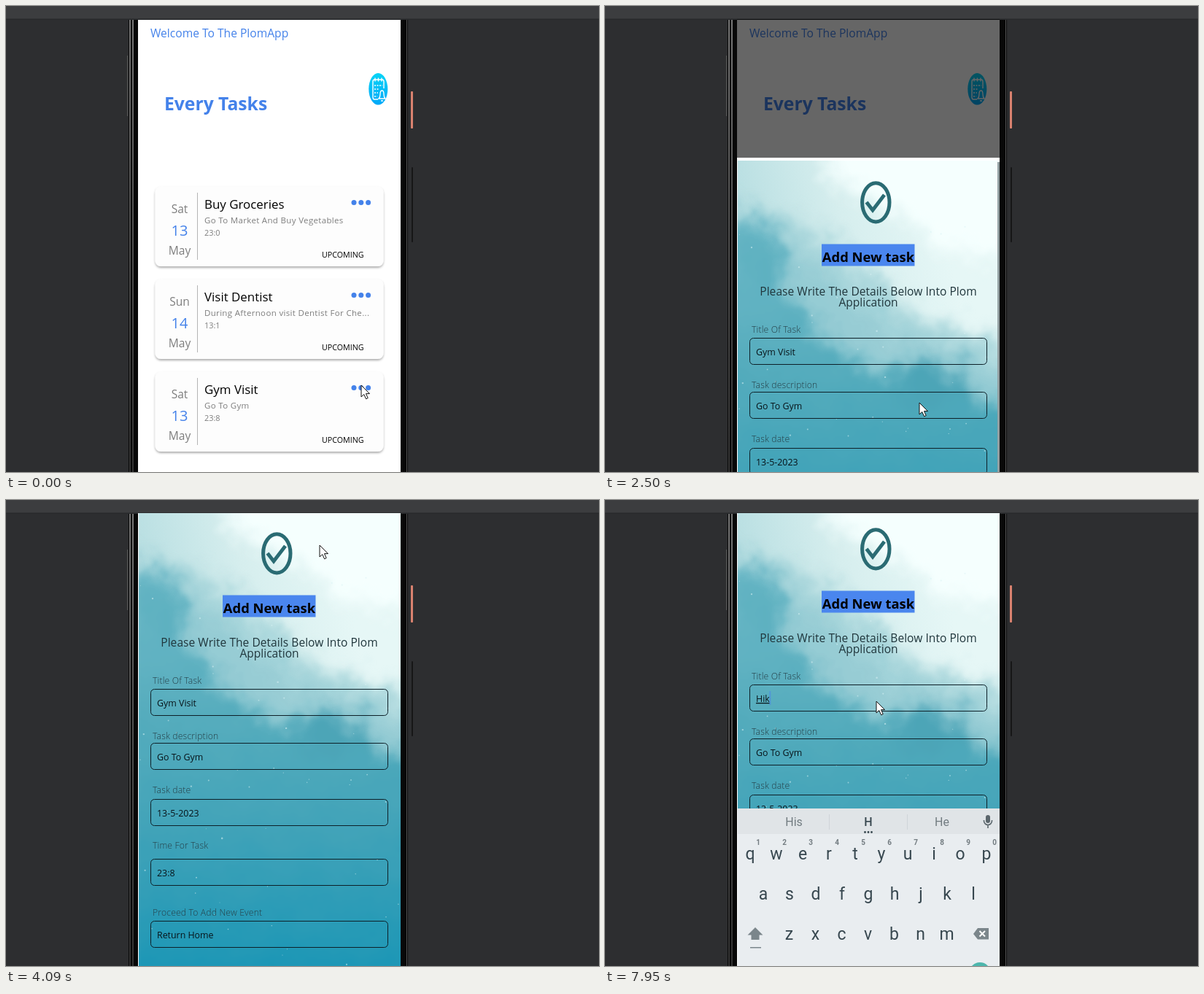
These frames come from a looping animation (813 px wide and 639 px high, 8 s). An HTML page:

```html
<!DOCTYPE html>
<html lang="en">
<head>
<meta charset="utf-8">
<title>Task list</title>
<style>
html, body { margin: 0; width: 100%; height: 100%; overflow: hidden; background: #2d2e30; }
svg { display: block; width: 813px; height: 639px; }
text { font-family: "Open Sans", "Noto Sans", sans-serif; white-space: pre; }
.kb text { font-family: Roboto, sans-serif; text-anchor: middle; }
.mid { text-anchor: middle; }
.light { font-weight: 300; }
.bold { font-weight: 700; }
#word { text-decoration: underline; }
</style>
</head>
<body>
<svg id="stage" viewBox="0 0 813 639"></svg>
<script>
const BLUE = '#4482ea', GREY = '#7d7d7d';

const text = (x, y, size, str, fill = '#000', cls = '', gap = 0) =>
  `<text x="${x}" y="${y}" font-size="${size}" fill="${fill}" class="${cls}" letter-spacing="${gap}">${str}</text>`;
const rect = (x, y, w, h, fill, extra = '') =>
  `<rect x="${x}" y="${y}" width="${w}" height="${h}" fill="${fill}" ${extra}/>`;
const dot = (x, y, r, fill, extra = '') =>
  `<circle cx="${x}" cy="${y}" r="${r}" fill="${fill}" ${extra}/>`;
const list = (n, fn) => Array.from({ length: n }, (_, i) => fn(i)).join('');

let seed = 11;
const rand = () => (seed = seed * 16807 % 2147483647) / 2147483647;

const defs = `<defs>
  <clipPath id="screen">${rect(181, 18, 360, 621, '#fff')}</clipPath>
  <clipPath id="paper">${rect(182, 10, 359, 756, '#fff')}</clipPath>
  <linearGradient id="sky" gradientUnits="userSpaceOnUse" x1="182" y1="60" x2="440" y2="0">
    <stop stop-color="#b9dfe2"/><stop offset=".5" stop-color="#d6eeee"/><stop offset="1" stop-color="#e6f7f6"/>
  </linearGradient>
  <linearGradient id="sea" gradientUnits="userSpaceOnUse" x1="0" y1="80" x2="0" y2="660">
    <stop stop-color="#70bac8"/><stop offset=".4" stop-color="#53abbc"/>
    <stop offset=".65" stop-color="#3fa2b8"/><stop offset="1" stop-color="#1895b5"/>
  </linearGradient>
  <linearGradient id="badge" x2="0" y2="1">
    <stop stop-color="#08d4f6"/><stop offset="1" stop-color="#00a8f8"/>
  </linearGradient>
  <linearGradient id="edge" x2="0" y2="1">
    <stop stop-color="#777"/><stop offset=".4" stop-color="#555"/><stop offset="1" stop-color="#333"/>
  </linearGradient>
  <filter id="wash" filterUnits="userSpaceOnUse" x="130" y="-40" width="460" height="840" color-interpolation-filters="sRGB">
    <feGaussianBlur stdDeviation="13" result="soft"/>
    <feTurbulence type="fractalNoise" baseFrequency=".025" numOctaves="3" seed="4"/>
    <feDisplacementMap in="soft" scale="45" xChannelSelector="R" yChannelSelector="G"/>
  </filter>
  <filter id="shade" x="-10%" y="-10%" width="120%" height="130%">
    <feDropShadow dx="0" dy="2" stdDeviation="1.7" flood-opacity=".32"/>
  </filter>
</defs>`;

const phone = rect(0, 0, 813, 18, '#3c3d3f') + rect(0, 17.5, 813, 1, '#252628') +
  rect(168, 19, 13, 620, '#080808') + rect(541, 19, 10, 620, '#080808') +
  rect(169, 19, 2, 620, 'url(#edge)') + rect(173, 19, 2, 620, 'url(#edge)') +
  rect(549, 19, 1, 620, '#555') + rect(166, 68, 1, 83, '#555') +
  rect(555, 117, 3, 51, '#d9826f', 'rx="1"') + rect(556, 221, 2, 103, '#161617', 'rx="1"') +
  rect(181, 19, 360, 620, '#fff');

const card = ([day, date, title, note, time], i) => `<g transform="translate(0 ${127 * i})">
  ${rect(204.5, 247.5, 313, 109.5, '#fdfdfd', 'rx="8" filter="url(#shade)"')}
  ${rect(262, 256, 1, 92, '#b5b5b5')}
  ${text(238, 284, 15.5, day, GREY, 'mid')}${text(238, 315, 20, date, BLUE, 'mid')}
  ${text(238, 341, 15.5, 'May', GREY, 'mid')}
  ${text(272, 278, 16.9, title)}${text(272, 298, 11.5, note, GREY, '', .33)}
  ${text(272, 315, 10.9, time, GREY)}${text(433, 344.5, 10.7, 'UPCOMING')}
  ${list(3, k => dot(477 + 9.8 * k, 269.5, 3.5, BLUE))}</g>`;

const home = text(198, 43, 15.6, 'Welcome To The PlomApp', BLUE) +
  text(217, 143, 24.7, 'Every Tasks', BLUE, 'bold') +
  `<ellipse cx="510.3" cy="113.8" rx="13" ry="21.8" fill="url(#badge)"/>
  <g fill="none" stroke="#fff" stroke-width="1.4">
    <path d="M510 128h-5q-2 0-2-3v-21q0-3 2-3h11q2 0 2 3v9M506 98.500v5M510.500 98.500v5M515 98.500v5"/>
    <path d="M511 127q2-2 2-6 0-5 2.500-5t2.500 5q0 4 2 6zM514 130h3"/>
    <path d="M505 109h11M505 114h7M505 119h5M505 124h4" stroke-dasharray="2 1.500"/>
  </g>` +
  [['Sat', 13, 'Buy Groceries', 'Go To Market And Buy Vegetables', '23:0'],
   ['Sun', 14, 'Visit Dentist', 'During Afternoon visit Dentist For Che...', '13:1'],
   ['Sat', 13, 'Gym Visit', 'Go To Gym', '23:8']].map(card).join('');

const menu = `<g id="menu">${rect(369, 537, 180, 120, '#fcfcfc', 'filter="url(#shade)"')}
  ${rect(369, 578.5, 172, 42, '#e0e0e0', 'id="pressed"')}
  ${['Delete', 'Update', 'Complete'].map((s, i) => text(384, 564 + 42 * i, 13.6, s, '#1c1c1c')).join('')}</g>`;

const paint = rect(181, 6, 360, 760, '#fff') + rect(182, 10, 359, 756, 'url(#sky)') +
  `<g clip-path="url(#paper)"><g filter="url(#wash)">
    <path d="M300 -60H620V150Q500 160 430 105T310 40Z" fill="#f5fffe"/>
    <path d="M100 75L230 80 285 110 345 145 400 205 460 235 620 275V420H100Z" fill="#a3d3d9" opacity=".85"/>
    <path d="M240 130L290 150 350 205 400 250 450 262 520 290 620 310V420H240Z" fill="#8cc7d0" opacity=".65"/>
    <path d="M100 92L225 88 248 135 252 200 310 258 385 305 425 283 480 290 505 335 620 352V860H100Z" fill="url(#sea)"/>
    <path d="M395 300Q430 270 480 290L505 335 410 345Z" fill="#479fb4" opacity=".5"/>
    <path d="M185 100L230 110 235 180 200 190Z" fill="#58aebe" opacity=".6"/>
  </g></g>` +
  list(60, () => dot((184 + 354 * rand()).toFixed(1), (100 + 560 * rand()).toFixed(1),
    (.5 + .8 * rand()).toFixed(1), '#d8f2f4', 'opacity=".55"'));

const field = ([label, ly, y, value]) => text(201, ly, 12.2, label, '#253f47', 'light', .15) +
  rect(198.5, y, 325, 36, 'none', 'rx="5" stroke="#0d2028"') +
  (value ? text(207, y + 23.5, 12.4, value, '#08141a') : '');

const sheet = `<g id="sheet">${paint}${rect(538, 12, 3, 760, '#93a0a2', 'id="gap"')}
  <g fill="none" stroke="#2a6b73" stroke-width="5">
    <ellipse cx="371.300" cy="67.300" rx="18.700" ry="26.600"/><path d="M358.500 67l8.500 11 16-21"/></g>
  ${rect(297, 124.5, 127.5, 30, '#4a86ee')}
  ${text(361, 149, 18.4, 'Add New task', '#000', 'mid bold')}
  ${text(361, 195, 15.55, 'Please Write The Details Below Into Plom', '#20363c', 'mid', .04)}
  ${text(361, 210, 15.55, 'Application', '#20363c', 'mid')}
  ${[['Title Of Task', 246, 253.5], ['Task description', 322, 327.5, 'Go To Gym'],
     ['Task date', 396, 404.5, '13-5-2023'], ['Time For Task', 472, 486.5, '23:8'],
     ['Proceed To Add New Event', 564, 571.5, 'Return Home']].map(field).join('')}
  <text id="title" x="207" y="277" font-size="12.4" fill="#08141a"><tspan id="plain"></tspan><tspan id="word"></tspan></text>
  ${rect(0, 262, 2, 19, '#4a80ee', 'id="caret"')}
  <path id="handle" d="M260 281l6.400 5.600a9 9 0 1 1-12.800 0z" fill="#4a86ee"/></g>`;

const keyRow = (keys, x, y) => [...keys].map((k, i) => text(x + 36 * i, y, 23, k, '#37474f')).join('');

const keyboard = `<g id="keys" class="kb">${rect(182, 423, 359, 216, '#e9edf0')}${rect(182, 423, 359, 35, '#e0e4e7')}
  ${rect(307, 431, 1, 21, '#cfd4d8')}${rect(414, 431, 1, 21, '#cfd4d8')}
  ${list(3, i => `<text class="hint" x="${[259, 361, 462][i]}" y="447" font-size="16"
    fill="${i == 1 ? '#37474f' : '#717b80'}" font-weight="${i == 1 ? 500 : 400}"></text>`)}
  ${list(3, i => dot(356.5 + 4.5 * i, 455.5, 1.4, '#37474f'))}
  ${rect(522, 432, 6, 11, '#5b666c', 'rx="3"')}
  <path d="M519.500 439v1a5.500 5.500 0 0 0 11 0v-1M525 446v4" fill="none" stroke="#5b666c" stroke-width="1.600"/>
  ${list(10, i => text(210 + 36 * i, 473, 10, (i + 1) % 10, '#737c81', 'bold'))}
  ${keyRow('qwertyuiop', 199, 493)}${keyRow('asdfghjkl', 217, 548)}${keyRow('zxcvbnm', 252.5, 603)}
  <path d="M206 586l10.500 10.500h-5V603h-11v-6.500h-5zM199 613h15v1.500h-15z" fill="#7b868b"/>
  <path d="M505 595l6-8h15v15.500h-15z" fill="#7b868b"/>
  <path d="M513.500 591l7.500 7.500M521 591l-7.500 7.500" stroke="#fff" stroke-width="2"/>
  ${dot(514, 649, 15, '#4db6ac')}</g>`;

const pointer = `<path id="pointer" d="M0 0V16L3.800 12.600 6.600 18.800 9.200 17.600 6.500 11.600H11.500Z" fill="#fff" stroke="#111"/>`;

const $ = id => document.getElementById(id);
$('stage').innerHTML = defs + phone + `<g clip-path="url(#screen)">${home}${menu}
  ${rect(181, 18, 360, 621, '#000', 'id="dim" opacity=".6"')}${sheet}${keyboard}</g>` + pointer;
const hints = document.querySelectorAll('.hint');

// Stepped tracks: [start, ...values]
const path = [[0, 487, 520], [500, 487, 517], [620, 487, 508], [740, 486, 496], [890, 483, 505], [1010, 470, 535],
  [1130, 451, 567], [1250, 439, 583], [1400, 441, 590], [1520, 444, 597], [1670, 447, 598],
  [2230, 442, 586], [2370, 439, 572], [2500, 431, 544], [2620, 428, 507], [2770, 407, 460],
  [2920, 365, 457], [3040, 329, 467], [3190, 346, 430], [3310, 378, 360], [3430, 412, 285],
  [3560, 436, 225], [3680, 447, 195], [3830, 447, 51], [3950, 446, 13], [4090, 430, 62],
  [4210, 408, 150], [4340, 382, 240], [4460, 371, 276], [6600, 372, 276]];
const fade = [[0, 0], [500, .4], [620, .9], [740, 1], [2370, 0]];
const press = [[0, 0], [1820, .5], [1950, 1]];
const slide = [[0, 640], [2370, 430], [2500, 208], [3830, 78], [3950, 40], [4090, 12], [4210, 6]];
const rise = [[0, 220], [5240, 95], [5390, 0]];
const words = [['Visits', 'Visit', 'Visited'], ['Visit', 'Visi', 'Visited'], ['I', 'The', 'I’m'], ['His', 'H', 'He']];
// start, plain text, underlined text, caret, hint set
const typing = [[0, 'Gym Visit', '', 0, 0], [4720, 'Gym Visit', '', 1, 0], [5940, 'Gym ', 'Visi', 1, 1],
  [6060, 'Gym ', 'Vi', 1, 1], [6180, 'Gym ', '', 1, 1], [6330, '', '', 1, 1], [6600, '', '', 1, 2],
  [6900, '', '', 0, 2], [7400, 'H', '', 1, 2], [7680, 'Hi', '', 1, 3], [7800, 'Hik', '', 1, 3],
  [7950, '', 'Hik', .5, 3]];

const at = (track, t) => track.findLast(k => k[0] <= t).slice(1);
const move = (id, x, y) => $(id).setAttribute('transform', `translate(${x} ${y})`);
const alpha = (id, v) => { $(id).style.opacity = v; };

function draw(t) {
  move('pointer', ...at(path, t));
  alpha('menu', at(fade, t)[0]);
  alpha('pressed', at(press, t)[0]);
  alpha('dim', t < 2370 ? 0 : .6);
  move('sheet', 0, at(slide, t)[0] - 6);
  alpha('gap', t < 3190 ? 1 : 0);
  move('keys', 0, at(rise, t)[0]);
  const [plain, word, caret, set] = at(typing, t);
  $('plain').textContent = plain;
  $('word').textContent = word;
  alpha('caret', caret);
  $('caret').setAttribute('x', 207 + (plain + word ? $('title').getComputedTextLength() - .5 : 0));
  alpha('handle', t >= 4720 && t < 5790 ? 1 : 0);
  hints.forEach((h, i) => { h.textContent = words[set][i]; });
}

const start = performance.now();
(function tick() {
  draw((performance.now() - start) % 8000);
  requestAnimationFrame(tick);
})();
</script>
</body>
</html>
```
